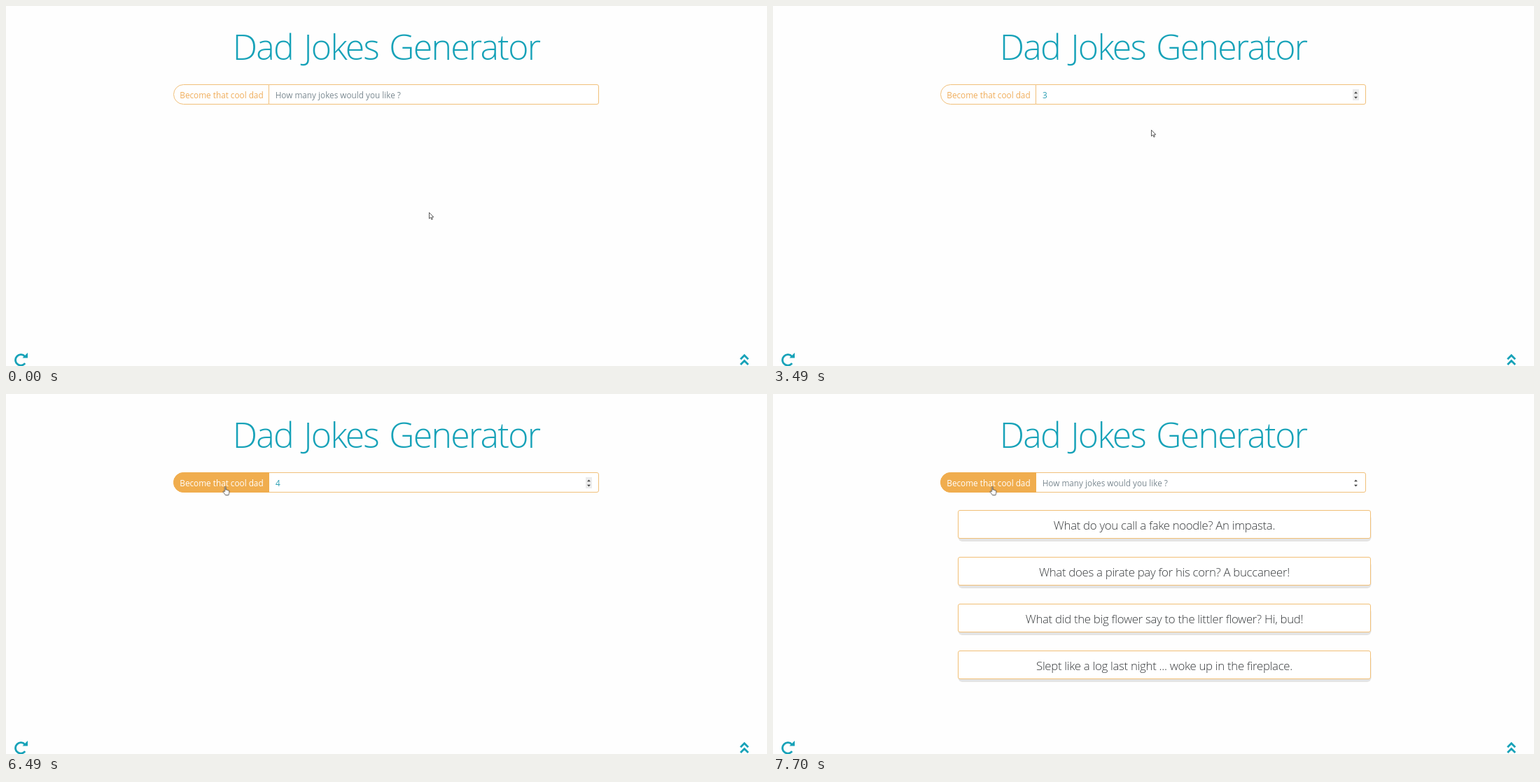
These frames come from a looping animation (1087x515 px, 8 s). An HTML page:

```html
<!DOCTYPE html>
<html lang="en">
<head>
<meta charset="utf-8">
<title>Dad Jokes Generator</title>
<style>
html, body { margin: 0; width: 100%; height: 100%; overflow: hidden; background: #fefefe; }
svg { display: block; width: 1087px; height: 515px; }
text { font: 11.75px "Open Sans", "Noto Sans", sans-serif; }
.title { font-size: 50px; font-weight: 300; letter-spacing: -1.75px; word-spacing: 4px; fill: #17a2b8; }
.hint { fill: #7c8a92; }
.digit { fill: #2b9fb3; }
.line { fill: none; stroke: #f1c07a; }
.icon { fill: none; stroke: #17a2b8; stroke-width: 2.8; }
.box { fill: #fff; stroke: #f1bf76; }
.shade { fill: #e4e4e4; }
.joke text { font-size: 16.8px; font-weight: 300; letter-spacing: -.3px; fill: #373a3c; text-anchor: middle; }
.pointer { fill: #fff; stroke: #333; stroke-width: .8; stroke-linejoin: round; }
.beam { fill: none; stroke: #333; }

/* everything advances in held steps on one 8 s clock; 1% = 80 ms */
.a { animation: 8s step-end infinite; }

.hint { animation-name: hint; }
@keyframes hint { 0%, 89.75% { opacity: 1 } 35.25% { opacity: 0 } }
.three { animation-name: three; }
@keyframes three { 0%, 59.875% { opacity: 0 } 35.25% { opacity: 1 } }
.four { animation-name: four; }
@keyframes four { 0%, 89.75% { opacity: 0 } 59.875% { opacity: 1 } }

.caret1 { animation-name: caret1; }
@keyframes caret1 { 0%, 35.25%, 96.25% { opacity: 0 } 28.125%, 89.75% { opacity: 1 } }
.caret2 { animation-name: caret2; }
@keyframes caret2 {
  0%, 42%, 55.875%, 69.625%, 79.625% { opacity: 0 }
  35.25%, 48.875%, 59.875%, 76% { opacity: 1 }
}

.spin { animation-name: spin; }
@keyframes spin { 0% { opacity: 0 } 11.75% { opacity: 1 } }
.spinbg { animation-name: spinbg; }
@keyframes spinbg { 0%, 89.75% { opacity: 0 } 11.75% { opacity: 1 } }
.spinup { animation-name: spinup; }
@keyframes spinup {
  0%, 68.125% { opacity: 0 }
  54.125%, 61.375% { opacity: 1; fill: #c9c9c9 }
  59.875% { opacity: 1; fill: #b4b4b4 }
}

.fill { animation-name: fill; }
@keyframes fill { 0% { opacity: 0 } 79.625% { opacity: .6 } 81.125% { opacity: 1 } }
.label { animation-name: label; }
@keyframes label { 0% { fill: #f0ad5a } 79.625% { fill: #fae0bd } 81.125% { fill: #fff } }
.ring { animation-name: ring; }
@keyframes ring { 0%, 89.75% { opacity: 0 } 88.125% { opacity: .5 } }

.j1 { animation-name: j1; }
.j2 { animation-name: j2; }
.j3 { animation-name: j3; }
.j4 { animation-name: j4; }
@keyframes j1 { 0% { opacity: 0 } 91.25% { opacity: 1 } }
@keyframes j2 { 0% { opacity: 0 } 92.875% { opacity: 1 } }
@keyframes j3 { 0% { opacity: 0 } 94.625% { opacity: 1 } }
@keyframes j4 { 0% { opacity: 0 } 96.25% { opacity: 1 } }

.mouse { animation-name: mouse; }
@keyframes mouse {
  0% { transform: translate(604px, 295px) }
  5.125% { transform: translate(603px, 290px) }
  6.875% { transform: translate(582px, 264px) }
  8.5% { transform: translate(540px, 218px) }
  10.125% { transform: translate(490px, 169px) }
  11.75% { transform: translate(456px, 136px) }
  13.375% { transform: translate(442.5px, 126.5px) }
  15.125% { transform: translate(421px, 127px) }
  16.625% { transform: translate(407.5px, 127.5px) }
  18.5% { transform: translate(403px, 129px) }
  20% { transform: translate(401.5px, 129.5px) }
  42% { transform: translate(460px, 147px) }
  43.625% { transform: translate(540px, 177px) }
  45.5% { transform: translate(690px, 188px) }
  47% { transform: translate(807px, 154px) }
  48.875% { transform: translate(841px, 142px) }
  50.375% { transform: translate(849px, 123px) }
  52.25% { transform: translate(839.5px, 122.5px) }
  54.125% { transform: translate(834px, 122px) }
  55.875% { transform: translate(833px, 122px) }
  62.875% { transform: translate(832px, 122px) }
  68.125% { transform: translate(822px, 143px) }
  69.625% { transform: translate(785px, 170px) }
  71.25% { transform: translate(723px, 191px) }
  73% { transform: translate(590px, 215px) }
  74.5% { transform: translate(420px, 203px) }
  76% { transform: translate(318px, 165px) }
  77.875% { transform: translate(308.5px, 136.5px) }
  79.625% { transform: translate(309.5px, 132px) }
}
.arrow { animation-name: arrow; }
@keyframes arrow { 0%, 42%, 54.125% { opacity: 1 } 11.75%, 52.25%, 77.875% { opacity: 0 } }
.beam { animation-name: beam; }
@keyframes beam { 0%, 40.25%, 54.125% { opacity: 0 } 11.75%, 52.25% { opacity: 1 } }
.hand { animation-name: hand; }
@keyframes hand { 0% { opacity: 0 } 77.875% { opacity: 1 } }
</style>
</head>
<body>
<svg viewBox="0 0 1087 515">
  <defs>
    <g id="card">
      <rect class="shade" x="264.5" y="172" width="590" height="39" rx="6"/>
      <rect class="box" x="264.5" y="166.5" width="589" height="40" rx="2.5"/>
    </g>
    <path id="pill" d="M375.5 112.5H253.5a14 14 0 0 0 0 28H375.5Z"/>
  </defs>

  <text class="title" x="323.7" y="77">Dad Jokes Generator</text>

  <path class="line" d="M375.5 112.5H844a2.5 2.5 0 0 1 2.5 2.5V138a2.5 2.5 0 0 1-2.5 2.5H375.5" style="fill: #fff"/>
  <use href="#pill" class="line"/>
  <use href="#pill" class="a ring" fill="none" stroke="#f0ad4e" stroke-width="4"/>
  <use href="#pill" class="a fill" fill="#f0ad4e" stroke="#f0ad4e"/>
  <text class="a label" x="248.3" y="131.6">Become that cool dad</text>

  <text class="a hint" x="384.7" y="132">How many jokes would you like ?</text>
  <text class="a digit three" x="385" y="132">3</text>
  <text class="a digit four" x="385" y="132">4</text>
  <rect class="a caret1" x="385" y="119" width="1" height="16" fill="#7a868c"/>
  <rect class="a caret2" x="391" y="119" width="1" height="16" fill="#2b9fb3"/>

  <rect class="a spinbg" x="828" y="119" width="9" height="16" fill="#ececec"/>
  <rect class="a spinup" x="828" y="119" width="9" height="8"/>
  <path class="a spin" d="M830 125.2L832.5 122.4 835 125.2ZM830 129.8L832.5 132.6 835 129.8Z" fill="#444"/>

  <g class="a joke j1">
    <use href="#card"/>
    <text x="559" y="193.6">What do you call a fake noodle? An impasta.</text>
  </g>
  <g class="a joke j2">
    <use href="#card" y="67"/>
    <text x="559" y="260.6">What does a pirate pay for his corn? A buccaneer!</text>
  </g>
  <g class="a joke j3">
    <use href="#card" y="134"/>
    <text x="559" y="327.6">What did the big flower say to the littler flower? Hi, bud!</text>
  </g>
  <g class="a joke j4">
    <use href="#card" y="201"/>
    <text x="559" y="394.6">Slept like a log last night ... woke up in the fireplace.</text>
  </g>

  <path class="icon" d="M27 501.3A7.7 7.7 0 1 0 27.2 511.2"/>
  <path d="M31 496V503.5H23.5Z" fill="#17a2b8"/>
  <path class="icon" d="M1049.2 505.3L1054.7 499.8 1060.2 505.3M1049.2 513L1054.7 507.5 1060.2 513"/>

  <g class="a mouse">
    <path class="a pointer arrow" d="M.5.5V9.2L2.6 7.4 4 10.6 5.3 10 4 7H6.8Z"/>
    <path class="a beam" d="M-2-4.5Q0-4.5 0-3.5V3.5Q0 4.5-2 4.5M2-4.5Q0-4.5 0-3.5M0 3.5Q0 4.5 2 4.5"/>
    <path class="a pointer hand" d="M3 7.5V1.3Q3 .5 3.8.5T4.6 1.3V5Q6 4.4 6.3 5.5Q7.6 5 7.8 6Q9.2 5.6 9.3 7V9.5Q9 11 8.3 12.7H4Q3 11 .8 8.3Q.4 7 1.6 7.1Z"/>
  </g>
</svg>
</body>
</html>
```
